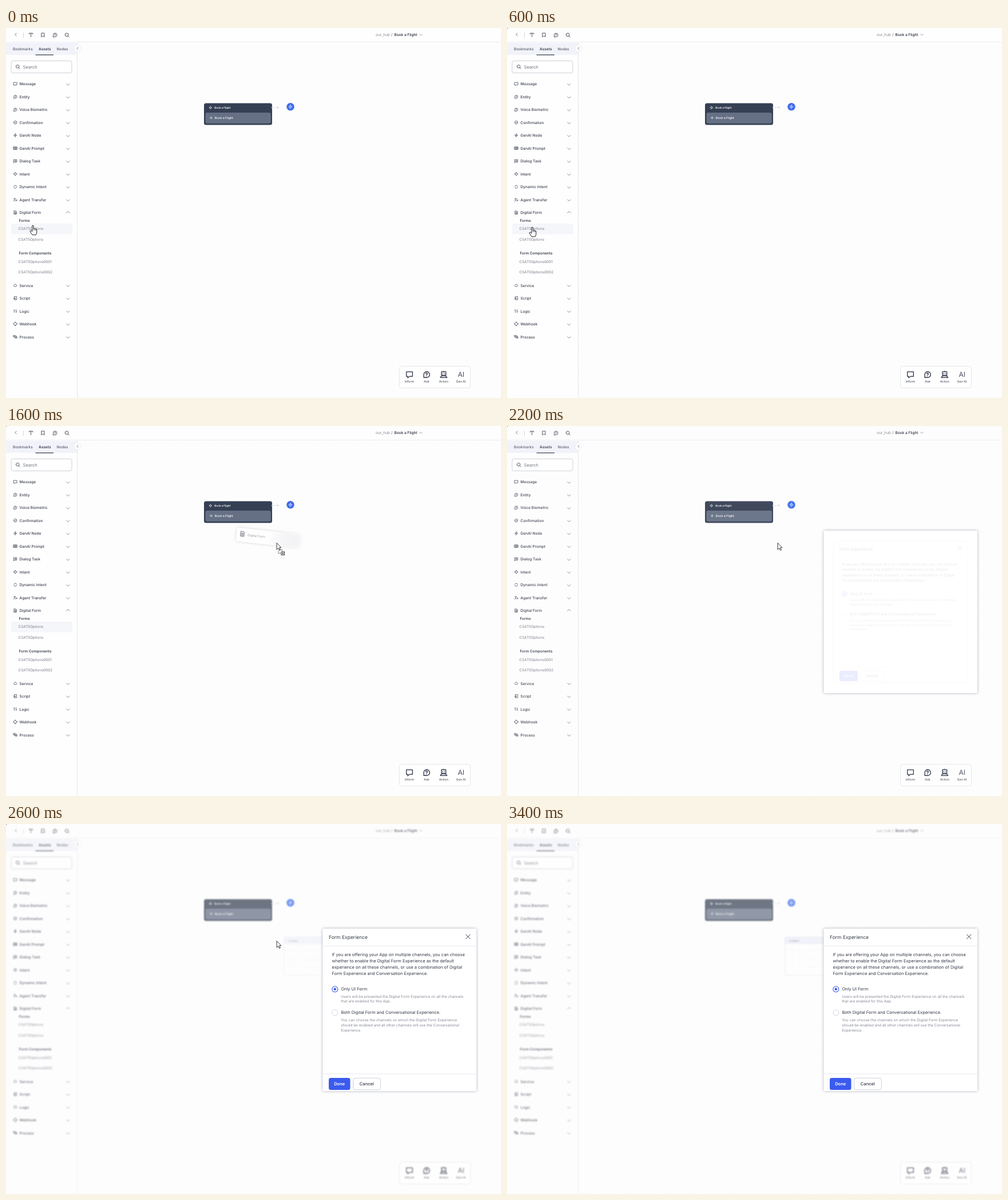
An HTML page that plays this animation: 865x647 px, repeating every 3.8 s.

```html
<!DOCTYPE html>
<html lang="en">
<head>
<meta charset="utf-8">
<title>Dragging a form onto a flow</title>
<style>
html, body { margin: 0; width: 100%; height: 100%; overflow: hidden; background: #fdfdfd; }
svg { display: block; font-family: Inter, "Liberation Sans", sans-serif; text-rendering: geometricPrecision; }
.icon { fill: none; stroke: #474c5c; stroke-width: .8; stroke-linecap: round; stroke-linejoin: round; }
.box { filter: drop-shadow(0 0 2.5px #8086a0a0); }
</style>
</head>
<body>
<svg id="stage" width="865" height="647" viewBox="0 0 865 647"></svg>
<script>
const INK = '#393e4e', GREY = '#777b88', LINE = '#e6e7ec', BLUE = '#3b5bee';

const text = (x, y, str, size = 6.55, fill = INK, weight = 500, anchor = 'start') =>
  `<text x="${x}" y="${y + size * .36}" font-size="${size}" fill="${fill}" font-weight="${weight}" text-anchor="${anchor}">${str}</text>`;
const rect = (x, y, w, h, fill, r = 0, more = '') =>
  `<rect x="${x}" y="${y}" width="${w}" height="${h}" rx="${r}" fill="${fill}" ${more}/>`;
const circle = (x, y, r, fill, more = '') => `<circle cx="${x}" cy="${y}" r="${r}" fill="${fill}" ${more}/>`;
const icon = (x, y, d, scale = 1, color = '#474c5c') =>
  `<path class="icon" transform="translate(${x} ${y}) scale(${scale})" style="stroke:${color}" d="${d}"/>`;
const stroke = (color, width = 1) => `stroke="${color}" stroke-width="${width}"`;
const group = (id, body, more = '') => `<g id="${id}" ${more}>${body}</g>`;

// Icons are drawn around 0,0 and reach about 3 px each way.
const ICONS = {
  bubble: 'M-2.8 -2.5H2.8V1.7H0L-1.6 3V1.7H-2.8Z',
  ask: 'M-2.6 2.7V0A2.7 2.7 0 1 1 0 2.7ZM-.8 -.8Q0 -2 .8 -.8Q.8 -.2 0 .2M0 1.2V1.3',
  check: 'M-2.7 0A2.7 2.7 0 1 1 2.7 0A2.7 2.7 0 1 1 -2.7 0M-1.2 0L-.3 .9L1.3 -.9',
  spark: 'M.5 -3L-2.6 .4H0L-.5 3L2.6 -.4H0Z',
  grid: 'M-3 -2.3H3V2.3H-3ZM-1 -2.3V2.3M1 -2.3V2.3M-3 0H3',
  task: 'M-2.6 -2.6H2.6V1.8H-1L-2.6 3ZM-1.2 -1H1.2M-1.2 .4H1.2',
  target: 'M0 -3V-2M0 3V2M-3 0H-2M3 0H2M-2 0A2 2 0 1 1 2 0A2 2 0 1 1 -2 0',
  dynamic: 'M-2.4 -.8A2.5 2.5 0 0 1 2.4 -.8M-2.4 .8A2.5 2.5 0 0 0 2.4 .8',
  agent: 'M-2.2 -1.3A1.3 1.3 0 1 1 .4 -1.3A1.3 1.3 0 1 1 -2.2 -1.3M-3 2.6Q-.9 -.4 1 2.6M1.6 1H3.2M2.4 .2V1.8',
  form: 'M-2 -2.8H1L2.2 -1.5V2.8H-2ZM-1 -.8H1.2M-1 .4H1.2M-1 1.6H1.2',
  cloud: 'M-1.6 2A1.5 1.5 0 0 1 -1.7 -.8A1.8 1.8 0 0 1 1.7 -.8A1.5 1.5 0 0 1 1.6 2Z',
  script: 'M-1.5 -2.8H2.5V2.8H-1.5ZM-2.8 .4H.6M-.4 -.6L.6 .4L-.4 1.4',
  logic: 'M-1.6 2.6V-2.4L-2.8 -1.2M1.4 -2.6V2.4L2.8 1.2',
  hook: 'M0 -2.8L2.8 0L0 2.8L-2.8 0ZM-1 -3H1M-1 3H1M-3 -1V1M3 -1V1',
  process: 'M-3 -2.4H-.8V-.4H-3ZM.8 .4H3V2.4H.8ZM-.8 -1.4H2V.4M-2 -.4V1.4H.8',
  search: 'M-2.8 -.4A2.4 2.4 0 1 1 2 -.4A2.4 2.4 0 1 1 -2.8 -.4M1.4 1.4L3 3',
  bookmark: 'M-2 -2.8H2V2.8L0 1.2L-2 2.8Z',
  type: 'M-2.6 -1.4V-2.6H2.6V-1.4M0 -2.6V2.6',
  robot: 'M-2 -2.6H2V.6H-2ZM-.8 -1V-.9M.8 -1V-.9M-3 2.8Q-2.6 1 0 1Q2.6 1 3 2.8ZM0 -2.6V-3.2',
  down: 'M-2.6 -1.2L0 1.3L2.6 -1.2',
  up: 'M-2.8 1.2L0 -1.3L2.8 1.2',
  left: 'M1.2 -2.4L-1.2 0L1.2 2.4',
  cross: 'M-3 -3L3 3M3 -3L-3 3'
};

function sidebar() {
  const row = (y, [name, mark]) =>
    icon(16.2, y - .3, ICONS[mark]) + text(23.6, y, name) +
    icon(108.4, y + (mark === 'form' ? -1 : .8), ICONS[mark === 'form' ? 'up' : 'down'], 1, '#666b78');
  const top = [['Message', 'bubble'], ['Entity', 'ask'], ['Voice Biometric', 'ask'], ['Confirmation', 'check'],
    ['GenAI Node', 'spark'], ['GenAI Prompt', 'grid'], ['Dialog Task', 'task'], ['Intent', 'target'],
    ['Dynamic Intent', 'dynamic'], ['Agent Transfer', 'agent'], ['Digital Form', 'form']];
  const bottom = [['Service', 'cloud'], ['Script', 'script'], ['Logic', 'logic'], ['Webhook', 'hook'], ['Process', 'process']];
  const forms = [['CSAT5Options', 351.2], ['CSAT5Options', 369.8], ['CSAT5Options0001', 408.3], ['CSAT5Options0002', 426.4]];
  return rect(0, 25, 124.5, 622, '#fefefe') +
    rect(0, 26, 124, 21, '#f2f3fa') + rect(124, 25, 1, 622, LINE) +
    text(12, 37, 'Bookmarks', 6.45, '#555a68') + text(57, 37, 'Assets', 6.5, INK, 600) + text(88.5, 37, 'Nodes', 6.45, '#555a68') +
    rect(51.5, 46.3, 31.5, 1.4, '#4a5064') +
    circle(125, 35.5, 6, '#fff', stroke(LINE, .8)) + icon(125, 35.5, ICONS.left, .9) +
    rect(9, 57.5, 106, 21, '#fff', 3, stroke('#c9ccd3', .9)) +
    icon(20.7, 67.8, ICONS.search, 1.15) + text(29.6, 68, 'Search', 7.6, '#70747f', 400) +
    rect(9, 342, 107, 18.5, '#f5f6fa', 2, 'id="hover"') +
    top.map((r, i) => row(98 + 22.5 * i, r)).join('') +
    bottom.map((r, i) => row(450.2 + 22.5 * i, r)).join('') +
    text(22.5, 337, 'Forms', 6.4, INK, 600) + text(22.5, 394, 'Form Components', 6.4, INK, 600) +
    forms.map(([name, y]) => text(21.6, y, name, 6.35, GREY, 400)).join('');
}

function topBar() {
  return rect(0, 0, 865, 24.5, '#fefefe') + rect(0, 24.2, 865, .9, '#ececf1') +
    icon(17, 11.5, ICONS.left) + rect(30, 8, .8, 9, '#c9ccd3') +
    ['type', 'bookmark', 'ask', 'search'].map((k, i) => icon(43.6 + 21 * i, 12.3, ICONS[k], 1.2)).join('') +
    text(646, 12, 'our_hub', 6.5, '#858590', 400) + text(673, 12, '/', 6.5, GREY) +
    text(678.4, 12, 'Book a Flight', 6.5, '#23283a') + icon(725, 11.7, ICONS.down, .9, GREY);
}

function flow() {
  return rect(346, 131.5, 119, 38, '#364054', 3.5) +
    rect(349, 148.5, 113.3, 17.8, '#667085', 2, stroke('#7b8497', .6)) +
    icon(357.3, 139.3, ICONS.target, .8, '#fff') + text(364.3, 139.6, 'Book a Flight', 4.5, '#fff', 600) +
    icon(358.5, 157, ICONS.target, .65, '#fff') + text(364.8, 157, 'Book a Flight', 5.2, '#fff') +
    circle(465.3, 139, 1.3, '#d5d8df') + '<path d="M468 139H474" stroke="#b9bdc8" stroke-width=".8" stroke-dasharray="1.6 2"/>' +
    '<path d="M474 137.5L477 139L474 140.5Z" fill="#c3c6d0"/>' +
    circle(497, 137.8, 6.8, '#406cec') + icon(497, 137.8, ICONS.spark, 1.15, '#cfdcff');
}

function palette() {
  const item = (x, label, mark) => icon(x, 606, ICONS[mark], 1.9) + text(x, 618, label, 5.4, INK, 400, 'middle');
  return rect(687.5, 591.5, 124, 38, '#fff', 4, stroke('#e3e5ea')) +
    item(705, 'Inform', 'bubble') + item(735, 'Ask', 'ask') + item(764.8, 'Action', 'robot') +
    text(795.2, 606, 'AI', 12, '#474c5c', 400, 'middle') + text(795, 618, 'Gen AI', 5.4, INK, 400, 'middle');
}

function table() {
  return rect(485.5, 197.5, 160, 67, '#fefefe', 1, stroke('#e3e4ee')) + rect(486, 198, 159, 12, '#ecedf8') +
    text(493, 204, 'Untitled', 4.6, GREY) +
    [220, 236, 250].map(y => rect(496, y, 4, .8, '#d2d4df') + rect(520, y, 28, .6, '#eeeff5')).join('');
}

function dialog() {
  const lines = (x, y, gap, size, fill, rows) => rows.map((r, i) => text(x, y + gap * i, r, size, fill, 400)).join('');
  return rect(553.5, 183, 268.5, 284, '#fff', 1, 'class="box"') +
    text(564, 197.8, 'Form Experience', 8.5, '#343949', 400) + icon(807.3, 197, ICONS.cross, 1.25, '#3d4250') +
    rect(554, 212.8, 268, .9, LINE) + rect(554, 436.6, 268, .9, LINE) +
    lines(569.6, 228.8, 10.7, 7.47, '#343949', [
      'If you are offering your App on multiple channels, you can choose',
      'whether to enable the Digital Form Experience as the default',
      'experience on all these channels, or use a combination of Digital',
      'Form Experience and Conversation Experience.']) +
    circle(574.8, 288.8, 5, '#fff', stroke(BLUE, 1.1)) + circle(574.8, 288.8, 2.2, BLUE) +
    text(585.4, 288.8, 'Only UI Form', 7.45, '#343949', 400) +
    lines(585.2, 301.3, 8.7, 6.4, '#858995', [
      'Users will be presented the Digital Form Experience on all the channels',
      'that are enabled for this App.']) +
    circle(574.8, 330, 5, '#fff', stroke('#cfd2d9', .9)) +
    text(585.4, 329.8, 'Both Digital Form and Conversational Experience.', 7.45, '#343949', 400) +
    lines(585.2, 342.8, 8.7, 6.4, '#858995', [
      'You can choose the channels on which the Digital Form Experience',
      'should be enabled and all other channels will use the Conversational',
      'Experience.']) +
    rect(564, 444, 37.5, 21, BLUE, 3.5) + text(582.7, 454.2, 'Done', 7.5, '#fff', 600, 'middle') +
    rect(606.8, 444.3, 47.6, 20.4, '#fff', 3.5, stroke('#c9ccd3', .9)) + text(630.4, 454.2, 'Cancel', 7.6, '#343949', 500, 'middle');
}

// Pointer parts share the tip as their origin.
const ghost = `<g transform="translate(-69 -27) rotate(6.2)">
  <g class="box" opacity=".55">${rect(0, 0, 112, 24, 'url(#fade)', 2)}</g>
  ${icon(10, 10, ICONS.form, 1.5, '#8b8e98')}${text(19.5, 11, 'Digital Form', 5.5, '#9b9da6', 400)}</g>`;
const arrow = '<path d="M0 0V11.5L2.7 9L4.5 13L6.3 12.2L4.5 8.3H8Z" fill="#fff" stroke="#222" stroke-width=".9" stroke-linejoin="round"/>';
const copyMark = '<path d="M3 14V18H7M5 12H10V15" fill="none" stroke="#222" stroke-width=".9" stroke-dasharray="1.4 1"/>' +
  rect(8, 15.5, 5.6, 5.6, '#fff', 0, stroke('#222', .9)) + '<path d="M9.2 18.3H12.4M10.8 16.7V19.9" stroke="#222" stroke-width=".9"/>';
const hand = `<path d="M-1.2 .8Q0 -.5 1.2 .8V6Q2.4 5.2 3.4 6.2Q4.6 5.5 5.4 6.7Q6.8 6.5 6.8 8V12Q6.8 14 5.4 16.8H-1L-4.8 11Q-5.4 9.3 -3.6 9.2L-1.2 11Z"
  fill="#fff" stroke="#222" stroke-width="1" stroke-linejoin="round"/><path d="M1.2 6V9M3.4 6.2V9M5.4 6.7V9" stroke="#222" stroke-width=".7"/>`;

const stage = document.getElementById('stage');
stage.innerHTML = `<defs>
  <pattern id="dots" width="10" height="10" patternUnits="userSpaceOnUse">${circle(5, 5, .6, '#f2f2f5')}</pattern>
  <linearGradient id="fade"><stop stop-color="#fff"/><stop offset=".5" stop-color="#fff"/><stop offset="1" stop-color="#fff" stop-opacity=".4"/></linearGradient>
  </defs>` + rect(0, 0, 865, 647, '#fdfdfd') +
  group('page', rect(125, 25, 740, 622, 'url(#dots)') + group('table', table()) + sidebar() + topBar() + flow() + palette()) +
  group('frame', rect(553.5, 183, 268.5, 284, '#fff', 1, 'class="box"')) +
  group('dialog', dialog()) +
  group('pointer', group('ghost', ghost) + group('hand', hand) + group('arrow', arrow) + group('copy', copyMark)) +
  rect(0, 0, 1, 1, '#333', 0, 'id="corner"');

const el = id => document.getElementById(id);
const show = (id, on) => { el(id).style.display = on ? '' : 'none'; };
const at = (t, keys) => keys.reduce((now, k) => t >= k[0] ? k : now).slice(1);

const POINTER = [[0, 47, 345], [200, 44, 348], [1000, 255, 285], [1200, 455, 216], [1400, 473, 204.5]];
// time, blur, page opacity, table opacity
const VEIL = [[0, 0, 1, 0], [2200, 0, .95, 0], [2400, .6, .73, .25], [2600, .8, .72, .65], [3000, .9, .71, .9]];
// time, scale, opacity, shift
const DIALOG = [[0, 1, 0, 0], [2200, .865, .1, 0], [2400, 1, 1, .5], [2600, 1, 1, 0]];

function draw(t) {
  const [x, y] = at(t, POINTER), [blur, light, tableLight] = at(t, VEIL), [scale, alpha, shift] = at(t, DIALOG);
  const dragging = t >= 1000 && t < 2200;
  el('pointer').setAttribute('transform', `translate(${x} ${y})`);
  show('pointer', t < 2800);
  show('hand', t < 1000);
  show('arrow', t >= 1000);
  show('ghost', dragging);
  show('copy', dragging);
  show('hover', t < 2200);
  show('corner', t >= 600 && t < 1000 || t >= 1600 && t < 3200);
  el('page').style.filter = blur ? `blur(${blur}px)` : 'none';
  el('page').style.opacity = light;
  el('table').style.opacity = tableLight;
  show('frame', t >= 2200 && t < 2400);
  show('dialog', alpha > 0);
  el('dialog').style.opacity = alpha;
  el('dialog').setAttribute('transform', `translate(${687.7 + shift} 325) scale(${scale}) translate(-687.7 -325)`);
}

const start = performance.now();
function loop() {
  draw((performance.now() - start) % 3800);
  requestAnimationFrame(loop);
}
loop();
</script>
</body>
</html>
```
